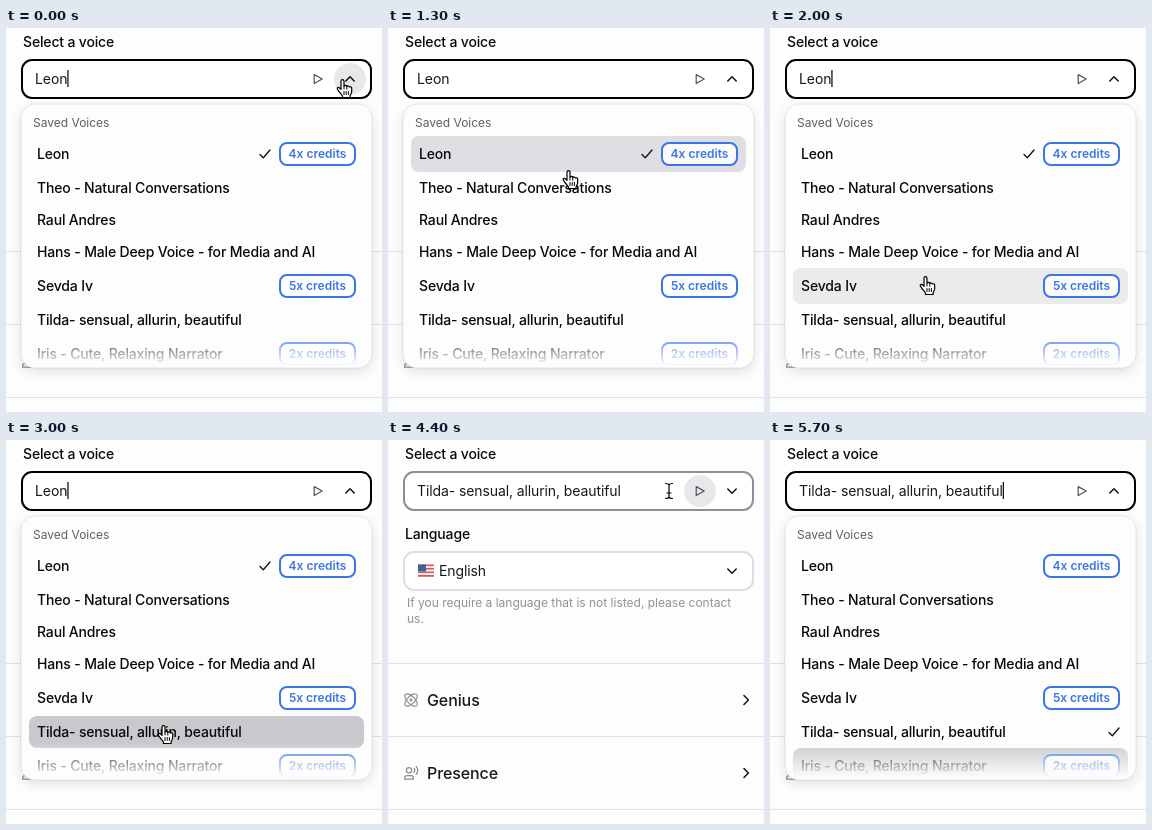
Write an HTML page that moves like this. It is 376 px wide and 384 px high and loops after 5800 ms.

```html
<!DOCTYPE html>
<html lang="en">
<head>
<meta charset="utf-8">
<title>Voice picker</title>
<style>
  html, body { margin: 0; width: 100%; height: 100%; overflow: hidden; background: #fdfdfd; }
  svg { display: block; width: 376px; height: 384px; }
  text { font-family: Inter, "Liberation Sans", sans-serif; font-size: 14px; fill: #09090b; white-space: pre; }
  .medium { font-weight: 500; letter-spacing: -.16px; }
  .value { fill: #18181b; letter-spacing: -.1px; }
  .small { font-size: 12px; fill: #91919a; }
  .heading { font-size: 16px; font-weight: 500; fill: #18181b; letter-spacing: -.1px; }
  .credits { font-size: 12px; font-weight: 600; fill: #3b76e8; text-anchor: middle; }
  .line { fill: none; stroke: #18181b; stroke-width: 1.6; stroke-linecap: round; stroke-linejoin: round; }
  .icon { fill: none; stroke: #8b8b94; stroke-width: 1.2; stroke-linecap: round; }
  .field { fill: #fff; stroke-width: 2; }
  .panel { filter: drop-shadow(0 4px 6px rgba(0, 0, 0, .11)); }
</style>
</head>
<body>
<svg viewBox="0 0 376 384" xmlns="http://www.w3.org/2000/svg">
  <defs>
    <linearGradient id="fade" x1="0" y1="302" x2="0" y2="338" gradientUnits="userSpaceOnUse">
      <stop offset="0" stop-color="#fdfdfd" stop-opacity="0"/>
      <stop offset="1" stop-color="#fdfdfd"/>
    </linearGradient>
    <clipPath id="panelClip"><rect x="15" y="76" width="351" height="264" rx="14"/></clipPath>
  </defs>
  <rect width="376" height="384" fill="#fdfdfd"/>
  <path d="M0 223.5H376M0 296.5H376M0 369.5H376" stroke="#e2e2e5"/>

  <text class="medium" x="17" y="19">Select a voice</text>
  <rect id="field" class="field" x="16" y="32" width="349" height="38" rx="10"/>
  <text id="value" class="value" x="29" y="56"></text>
  <rect id="caret" y="42" width="1.2" height="17"/>
  <circle id="playHover" cx="312" cy="51" r="16" fill="#e8e8eb"/>
  <path d="M308.2 46.6L316.2 51L308.2 55.6Z" fill="none" stroke="#52525b" stroke-width="1.2" stroke-linejoin="round"/>
  <circle id="chevronHover" cx="344" cy="51" r="16" fill="#e8e8eb"/>
  <path id="chevron" class="line"/>

  <text class="medium" x="17" y="99">Language</text>
  <rect class="field" x="16" y="112" width="349" height="38" rx="10" stroke="#dedee2"/>
  <g id="flag"></g>
  <text class="value" x="51" y="136">English</text>
  <path class="line" d="M339.8 129L344 133.2L348.2 129"/>
  <text class="small" x="19" y="167">If you require a language that is not listed, please contact</text>
  <text class="small" x="19" y="183">us.</text>

  <g class="icon">
    <ellipse cx="23" cy="260" rx="8" ry="3.7" transform="rotate(45 23 260)"/>
    <ellipse cx="23" cy="260" rx="8" ry="3.7" transform="rotate(-45 23 260)"/>
    <circle cx="23" cy="260" r=".8"/>
    <circle cx="21" cy="330.3" r="2.6"/>
    <path d="M16.6 339.2v-1.2q0-2.4 2.4-2.4h4q2.4 0 2.4 2.4v1.2zM26 328.3q1.6 2 0 4M28.2 326.3q3.2 4 0 8"/>
  </g>
  <text class="heading" x="39" y="266">Genius</text>
  <text class="heading" x="39" y="339">Presence</text>
  <path class="line" d="M356 255.5L360.4 260L356 264.5M356 328.5L360.4 333L356 337.5"/>

  <g id="menu">
    <rect class="panel" x="15" y="76" width="351" height="264" rx="14" fill="#fdfdfd"/>
    <g clip-path="url(#panelClip)">
      <rect id="highlight" x="23" width="335" rx="8"/>
      <text class="small" x="27" y="99" style="fill:#5f5f68">Saved Voices</text>
      <g id="rows"></g>
      <path id="check" class="line" d="M-5 .5L-1.7 3.8L5 -4" style="stroke-width:1.4"/>
      <rect x="15" y="302" width="351" height="38" fill="url(#fade)"/>
    </g>
    <rect x="15" y="76" width="351" height="264" rx="14" fill="none" stroke="#000" stroke-opacity=".09"/>
  </g>
  <g id="cursor" stroke-linejoin="round" stroke-linecap="round">
    <g id="hand" fill="#fff" stroke="#000" stroke-width="1.2">
      <path d="M-2 9V1.2a1.5 1.5 0 0 1 3 0V6.2a1.5 1.5 0 0 1 2.8 .3a1.5 1.5 0 0 1 2.6 .6a1.4 1.4 0 0 1 2.3 1.1v3.3c0 2-1.2 3-1.6 4.2V17.5H-.5V16c-1-1.6-2.6-3.2-4-5.2c-.9-1.2-1.8-2.2-1.2-3c.9-.9 2.2-.1 3.7 1.6z"/>
      <path d="M1 6.5V9M3.8 7V9.2M1 11.5V14.5M3.2 11.5V14.5M5.4 11.5V14.5" fill="none" stroke-width="1"/>
    </g>
    <path id="arrow" d="M0 0V14.5L3.4 11.4L5.7 16.6L8 15.6L5.8 10.6H10.3Z" stroke="#fff" stroke-width="1"/>
    <path id="beam" d="M-3.5 -7.5q3 0 3.5 1.5q.5 -1.5 3.5 -1.5M0 -6V6M-3.5 7.5q3 0 3.5 -1.5q.5 1.5 3.5 1.5M-2 2H2" fill="none" stroke="#000" stroke-width="1.2"/>
  </g>
</svg>
<script>
const LOOP = 5800, CLOSE = 3100, OPEN = 4600;
const $ = id => document.getElementById(id);
const set = (el, attrs) => { for (const k in attrs) el.setAttribute(k, attrs[k]); };
const show = (el, on) => { el.style.display = on ? '' : 'none'; };

const voices = [
  ['Leon', 4], ['Theo - Natural Conversations'], ['Raul Andres'],
  ['Hans - Male Deep Voice - for Media and AI'], ['Sevda Iv', 5],
  ['Tilda- sensual, allurin, beautiful'], ['Iris - Cute, Relaxing Narrator', 2]
];
const FIRST = 0, PICKED = 5, LAST = 6;

let rowTop = 108;
const rows = voices.map(([name, credits]) => {
  const h = credits ? 36 : 32, row = { name, credits, y: rowTop, h, mid: rowTop + h / 2 };
  rowTop += h;
  return row;
});

$('rows').innerHTML = rows.map(({ name, credits, mid }) =>
  `<text class="medium" x="31" y="${mid + 5}">${name}</text>` + (credits ?
  `<rect x="274" y="${mid - 11}" width="75" height="22" rx="7" fill="#fff" fill-opacity=".85" stroke="#3b76e8" stroke-width="2"/>
   <text class="credits" x="311.5" y="${mid + 4.3}">${credits}x credits</text>` : '')).join('');

$('flag').innerHTML = Array.from({ length: 7 }, (_, i) =>
  `<rect x="30" y="${124.5 + i * 1.75}" width="16" height="1.75" fill="${i % 2 ? '#f4eeee' : '#d8575c'}"/>`).join('') +
  '<rect x="30" y="124.5" width="8" height="7" fill="#43609c"/>';

// Pointer path: time, x, y
const path = [
  [0, 337, 52], [600, 337, 52], [1300, 181, 143], [1700, 166, 195], [2000, 156, 249],
  [2350, 156, 250], [2600, 158, 286], [3000, 158, 286], [3500, 200, 184], [4000, 311, 51],
  [4300, 311, 51], [4400, 281, 51], [4600, 281, 51], [4900, 254, 79], [5300, 240, 312], [LOOP, 240, 312]
];

function pointerAt(t) {
  const i = path.findIndex(p => p[0] > t);
  const [t0, x0, y0] = path[i - 1], [t1, x1, y1] = path[i];
  const u = (t - t0) / (t1 - t0), e = u * u * (3 - 2 * u);
  return { x: x0 + (x1 - x0) * e, y: y0 + (y1 - y0) * e };
}

function highlightColor(row, t) {
  if (row === FIRST && t < CLOSE) return '#dfdee2';
  if (row === PICKED && t > 2500 && t < CLOSE) return '#c9c8cc';
  return row === LAST ? '#c9c8cc' : '#ebebeb';
}

function render(t) {
  const isOpen = t < CLOSE || t >= OPEN;
  const chosen = rows[t < CLOSE ? FIRST : PICKED];
  const { x, y } = pointerAt(t);
  const inField = y > 31 && y < 71;
  const near = cx => Math.hypot(x - cx, y - 51) < 16;
  const hovered = isOpen ? rows.findIndex(r => y >= r.y && y < r.y + r.h) : -1;

  set($('field'), { stroke: isOpen ? '#000' : inField ? '#8e8e96' : '#dedee2' });
  $('value').textContent = chosen.name;
  set($('caret'), { x: 29 + $('value').getComputedTextLength() });
  show($('caret'), isOpen && (t + 400) % 1000 < 500);
  show($('playHover'), near(312) || (t >= 4300 && t < 4500));
  show($('chevronHover'), near(344));
  set($('chevron'), { d: isOpen ? 'M339.8 53L344 48.8L348.2 53' : 'M339.8 49L344 53.2L348.2 49' });

  show($('menu'), isOpen);
  show($('highlight'), hovered >= 0);
  if (hovered >= 0) {
    const { y: rowY, h } = rows[hovered];
    set($('highlight'), { y: rowY, height: h, fill: highlightColor(hovered, t) });
  }
  set($('check'), { transform: `translate(${chosen.credits ? 259 : 344} ${chosen.mid})` });

  const kind = hovered >= 0 || (inField && x > 296) ? 'hand' : inField ? 'beam' : 'arrow';
  show($('cursor'), t < 5400);
  set($('cursor'), { transform: `translate(${x.toFixed(1)} ${y.toFixed(1)})` });
  for (const id of ['hand', 'arrow', 'beam']) show($(id), id === kind);
}

const startTime = performance.now();
function tick() {
  render((performance.now() - startTime) % LOOP);
  requestAnimationFrame(tick);
}
tick();
</script>
</body>
</html>
```
